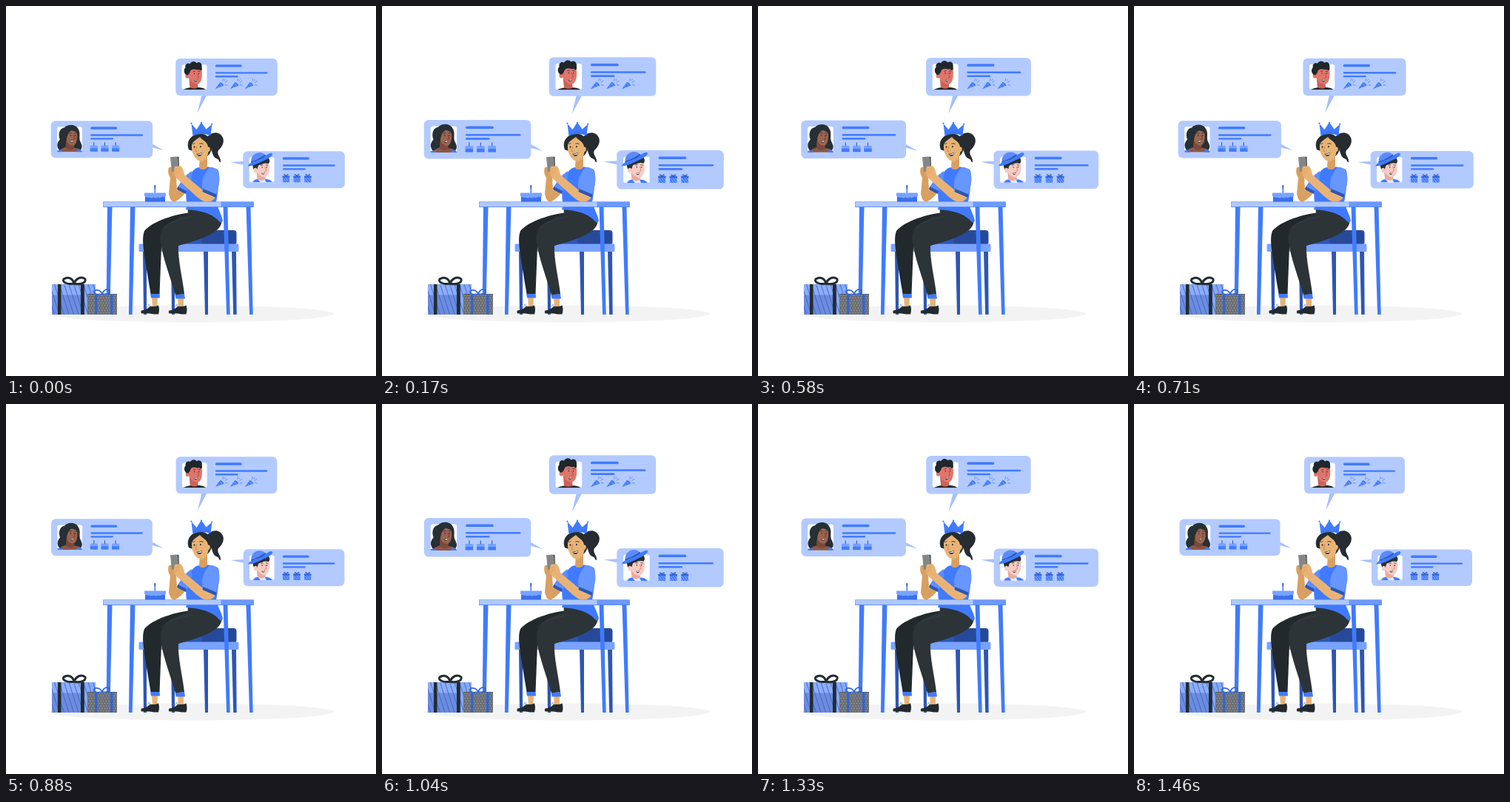
An HTML page with a canvas for the animation above (1.5 s loop, 500 by 500 pixels).

```html
<!DOCTYPE html>
<html lang="en">
<head>
<meta charset="utf-8">
<title>Birthday messages</title>
<style>
html, body { margin: 0; width: 100%; height: 100%; overflow: hidden; background: #fff; }
canvas { display: block; width: 500px; height: 500px; }
</style>
</head>
<body>
<canvas id="stage"></canvas>
<script>
const canvas = document.getElementById('stage');
const ratio = window.devicePixelRatio || 1;
canvas.width = canvas.height = 500 * ratio;
const ctx = canvas.getContext('2d');

const BLUE = '#407bff', PALE = '#b3caff', MID = '#79a2ff', NAVY = '#2d56b3', INK = '#263238';
const SKIN = '#e9b376', SKIN_SHADE = '#d99f60';
const LOOP = 1500;

// Beat of the bubbles: time in ms, growth from 0 (rest) to 1 (largest).
const BEAT = [[0, .11], [170, .63], [255, 1], [380, .75], [580, .43], [865, 0],
  [1150, 1], [1210, .77], [1460, 0], [1500, .11]];

function fill(path, color) {
  ctx.fillStyle = color;
  ctx.fill(new Path2D(path));
}

function stroke(path, color, width = 1) {
  ctx.strokeStyle = color;
  ctx.lineWidth = width;
  ctx.lineCap = ctx.lineJoin = 'round';
  ctx.stroke(new Path2D(path));
}

function box(x, y, w, h, color, r = 0) {
  ctx.fillStyle = color;
  ctx.beginPath();
  ctx.roundRect(x, y, w, h, r);
  ctx.fill();
}

function oval(x, y, rx, ry, color, turn = 0) {
  ctx.fillStyle = color;
  ctx.beginPath();
  ctx.ellipse(x, y, rx, ry, turn, 0, 7);
  ctx.fill();
}

function inside(path, draw) {
  ctx.save();
  ctx.clip(new Path2D(path));
  draw();
  ctx.restore();
}

function growth(t) {
  const i = BEAT.findIndex(([time]) => time > t);
  const [t0, a] = BEAT[i - 1], [t1, b] = BEAT[i];
  return a + (b - a) * (t - t0) / (t1 - t0);
}

function chair() {
  fill('M185 331h5v86h-4z', NAVY);
  fill('M223 331h5v86h-4z', NAVY);
  fill('M267 331h6v86h-4z', NAVY);
  fill('M305 331h6l.7 86h-4.500z', NAVY);
  box(236, 303, 75.5, 20, '#264a99', 4);
  fill('M236 303h29v20h-29z', NAVY);
  box(179.5, 321.5, 135, 10.5, MID, 1.5);
}

function table() {
  fill('M137 271h6.500l-3.200 146h-4.800z', BLUE);
  fill('M168 271h6.500l-3.800 146h-4.800z', BLUE);
  fill('M293.500 271h6l3.200 146h-4.600z', BLUE);
  fill('M324.500 271h6l3.200 146h-4.600z', BLUE);
  box(131, 264.2, 204, 7.6, '#6d98ff', .8);
  box(131.6, 264.8, 159, 6.4, '#b0c8ff');
  stroke('M131.500 271.500h203', BLUE, .6);
}

function tableCake() {
  box(188, 256, 27, 8.5, '#3a70ea');
  fill('M187 252.500h29v4q-2 3-4.500 1q-3 3-6 1q-3 2-6 0q-3 2-6 0q-4 1-6.500-2z', MID);
  stroke('M201.300 246v6', BLUE, 1.6);
  oval(201.3, 244, 1, 2.5, NAVY);
}

function bigGift() {
  box(62, 376, 59, 41, '#6b8ce0');
  box(62, 376, 59, 14.5, '#8cacfd');
  box(106, 376, 15, 41, '#85a8fa');
  inside('M62 376h59v41h-59z', () => {
    for (let x = 46; x < 122; x += 6.5) stroke(`M${x} 376l13 41`, '#3f61b4', .8);
  });
  box(70, 376, 4.5, 41, '#222c32');
  box(101, 376, 4.8, 41, '#222c32');
  stroke('M92 375C83 377 75 373 78 369C84 365 90 368 92 375C95 367 103 365 107 369C109 375 98 377 92 375', '#222c32', 3);
}

function smallGift() {
  box(110, 389, 40, 28, '#6d7075');
  for (let row = 0; row < 8; row++)
    for (let x = 112 + row % 2 * 1.8; x < 150; x += 3.6)
      oval(x, 391 + row * 3.4, .55, .8, '#a5a8ad');
  box(110, 389, 40, 1, '#55585d');
  box(120, 389, 3.5, 28, '#3265d5');
  box(141, 389, 3.5, 28, '#3265d5');
  stroke('M130 389C122 391 116 388 120 384C125 383 129 386 130 389C132 383 138 381 140 385C141 389 135 390 130 389', '#3265d5', 1.7);
}

function shoe(x) {
  fill(`M${x} 411.500Q${x + 7} 411 ${x + 12} 405.500Q${x + 18} 407 ${x + 23} 404.500Q${x + 25} 410 ${x + 23} 416.500H${x + 17}L${x + 11} 415.500L${x} 415.500Q${x - 1.500} 413 ${x} 411.500`, '#222a2f');
  stroke(`M${x + 9} 403l4 4m-1-4l-4 3`, '#8b9299', .7);
}

function legs() {
  fill('M197 393h8l-.500 13h-6.500z', SKIN);
  fill('M232 394h8v12h-7z', SKIN);
  fill('M195 389l12.500-1 .5 6.500h-12z', BLUE);
  fill('M228.500 390l12.500-1 1 6.500h-12.500z', BLUE);
  shoe(183);
  shoe(220.5);
  fill('M246 279.500C222 283 197 292 187 304C183 314 186 330 189 350L195.500 389H207.500L210 325L255 296z', '#22292d');
  fill('M245.500 274C267 276 291 278 291.500 292C289 308 260 316 233 324C232 342 239 370 241 389L229 390.500C222 366 210 336 208.500 314C209 295 228 288 246 281z', '#2d3438');
  stroke('M210 302C218 292 236 289 252 284', '#424a4f', .5);
}

function torso() {
  fill('M244 271h42C289 279 292 284 293 290Q292 294 289 292C278 279 260 276 243 275z', BLUE);
  fill('M257 219C267 216 279 217 286 221C290 225 287 249 284 265H244Q242 248 245 237Q249 224 257 219', BLUE);
  fill('M275 218.500C285 217 290 224 288 240L284 257L266 249Q262 232 275 218.500', '#6796ff');
}

function arms() {
  fill('M220 218C218 225 220 229 222 232L220 254Q222 266 229 264Q237 260 244 250L234 245L231 250L230 228L227 217z', SKIN_SHADE);
  fill('M251 223C242 228 235 239 231 247L243 253L250 240z', '#5c8eff');
  fill('M232 244L244 250L243 254L231 248z', NAVY);
  fill('M222 204L232 203.500L233 221L224 224z', '#858585');
  fill('M232 203.500l1.500 .5 .5 16-1 2z', '#303a40');
  fill('M228 217L236 216Q240 220 241 228L266 249L284 257Q279 266 269 265Q264 263 258 258L234 236Q226 230 227 222z', SKIN);
  stroke('M228 221l7-1m-8 4l7-1m-6 4l6-2', SKIN_SHADE, .7);
  fill('M266.500 247L284.500 254.500L283.500 259L265.500 251z', NAVY);
}

function head() {
  fill('M268 184C273 172 282 169 289 173C298 180 293 190 287 195C284 201 291 204 290 211C287 211 289 207 284 206C276 201 281 190 270 190z', '#262c30');
  fill('M262 204L272 200L272 218Q267 224 261 219z', SKIN_SHADE);
  fill('M247 194C243 183 250 174 260 173C270 171 280 179 279 190Q277 199 272 203L252 196z', '#262c30');
  fill('M251 188C252 183 258 180 262 177C266 182 272 183 273 190C275 200 271 209 264 210C256 209 250 199 251 188', SKIN);
  oval(273, 194, 2.7, 3.6, SKIN, .3);
  oval(254.5, 190.5, .9, 1.3, INK);
  oval(263, 190, .9, 1.3, INK);
  stroke('M252.500 186.500l2.500-1M261.500 186q2.500-1.500 5 .5', INK, .8);
  stroke('M258 190l-2 6 2 .5', '#b97940', .7);
  fill('M257.500 199.500Q262 200 264.500 197.500Q265 203 261 203Q258.500 202.500 257.500 199.500', INK);
  fill('M258 199.700Q262 200.500 264.200 198.300L263.800 200.500Q260 202 258 199.700', '#fff');
  fill('M250.500 159L257.500 167L264 157L270.500 166.500L278.500 159.500L276.500 175Q264 171 252.500 175.500z', BLUE);
  for (const [x, y] of [[250.5, 158.5], [264, 157.5], [278.3, 159.5]]) oval(x, y, 1.1, 1.1, BLUE);
  stroke('M253 173.500Q264 169.500 276 173.500', '#3266dc', .6);
}

function scene() {
  oval(250, 416, 193, 11.5, '#f3f3f3');
  chair();
  legs();
  torso();
  head();
  arms();
  table();
  tableCake();
  bigGift();
  smallGift();
}

// Bubbles are drawn from their top left corner.
function bubble(x, y, tail, pivot, scale, content) {
  ctx.save();
  ctx.translate(...pivot);
  ctx.scale(scale, scale);
  ctx.translate(x - pivot[0], y - pivot[1]);
  fill(tail, '#a5c0ff');
  box(0, 0, 136, 49.5, PALE, 6);
  box(8.3, 8, 33.5, 33.5, '#fff', 3);
  box(53, 8, 35.5, 3.4, BLUE, 1.6);
  box(53, 17.9, 70, 2.4, BLUE, 1.1);
  box(53, 22.7, 30.5, 2.4, BLUE, 1.1);
  content();
  ctx.restore();
}

function trio(draw) {
  for (let i = 0; i < 3; i++) {
    ctx.save();
    ctx.translate(53 + i * 14.5, 0);
    draw(i);
    ctx.restore();
  }
}

function smile(x, y) {
  fill(`M${x} ${y}q3 .5 4.500-1.500q0 3.800-2.700 3.800q-1.500-.8-1.800-2.300`, INK);
  fill(`M${x + .3} ${y + .2}q2.500 .5 3.900-1.200l-.3 1.700q-2 1-3.600-.5`, '#fff');
}

function eyes(x, y) {
  oval(x, y, .6, .9, INK);
  oval(x + 6, y, .6, .9, INK);
  stroke(`M${x - 1.500} ${y - 2.500}l2.500-.8m4 .3l2.500 .3`, INK, .7);
}

function popper(i) {
  ctx.translate(i * 5.3, 0);
  fill('M0 40.500L6.500 31.500Q10 32 11.500 36z', BLUE);
  stroke('M3.500 37l1.500 1.500M6 33.500l3 3', PALE, .6);
  stroke('M9.500 30.500q2-1 .8-3.500M13 32l3-2M13.500 35l3 .7M12.300 29.500l1-1.500', BLUE, .7);
}

function cake() {
  box(-.5, 36, 10, 5, BLUE);
  fill('M-.5 33h10v3q-2 2-3.300 0q-2 2-3.400 0q-2 2-3.300 0z', MID);
  stroke('M4.500 29v4', NAVY, 1);
}

function present() {
  box(0, 34, 9, 7.5, BLUE, .5);
  box(-.3, 32.8, 9.6, 2.4, '#3469df', .4);
  stroke('M1 36l4 5M4 35.500l4 5M0 39l2 2.300M7 35.500l2 2.300', PALE, .6);
  stroke('M4.500 33q-3.500-.5-3-2q2-.8 3 2q1-3 3-2q.5 1.500-3 2', NAVY, .8);
}

function curlyMan() {
  inside('M5 0H42V41.500H5z', () => {
    fill('M9 42Q13 39.500 20 38.500L32 38.500Q38 39 41 42z', '#20272b');
    fill('M18 27L29 29L30 38.500Q25 41.500 19 38.500z', '#cc6158');
    fill('M16 18C17 10 34 9 35 16C36 26 34 34 28 34.500C20 33 16 26 16 18', '#e0756b');
    oval(15.5, 23, 2.5, 3.5, '#e0756b');
    fill('M14.500 22C10 19 11 14 13 12C12 7 17 5 19 7C22 2 27 4 28 6C32 3 36 7 35 12Q36 16 33 16Q31 14 29 15Q22 13 20 16Q19 20 16.500 22z', '#20272b');
  });
  eyes(25, 20);
  stroke('M29 20l2 5-2 .5', '#a93f3d', .7);
  smile(24.5, 28.5);
  trio(popper);
}

function longHairWoman() {
  fill('M18 9C22 4 33 4 36 10C41 17 36 23 40 29Q44 37 38 40H12C7 35 8 29 12 25C9 17 12 10 18 9', '#263035');
  inside('M8 4H42V41.500H8z', () => {
    fill('M9 42Q13 37 20 35L32 36Q41 37 42 42z', '#8d5848');
    fill('M8.500 42V39.500Q15 38 17 42zM33 42Q35 38 40 38.500L41.500 42z', BLUE);
    fill('M20 26L31 28L31 37Q25 41 20 36z', '#7c4a3b');
    fill('M20 18C21 10 34 10 35 17C36 27 33 33 29 33C23 32 19 26 20 18', '#9c6350');
  });
  fill('M18 27C16 17 20 11 27 9Q35 9 36 17Q31 13 27 13Q22 17 21 24Q21 30 18 27', '#263035');
  eyes(26.5, 19.5);
  stroke('M30.500 19l1.700 5-2 .5', '#643828', .7);
  smile(25.5, 27);
  trio(cake);
}

function hatMan() {
  inside('M5 0H42V41.500H5z', () => {
    fill('M9 42Q14 37 20 36.500L31 36.500Q40 38 41 42z', '#dfe8ff');
    fill('M13 41.500Q16 37 20 37.500L23 41.500zM29 37.500Q36 37 39 41.500H31z', BLUE);
    fill('M18 28L29 29L30 37Q25 41 19 37z', '#eba99e');
    fill('M16 18C17 12 34 10 35 16C37 27 33 34.500 28 35C20 33 16 26 16 18', '#f7cbc2');
    fill('M14.500 25Q11 18 15 14L34 9Q37 14 34 16.500Q28 15 24 18Q20 18 19.500 22L18 26z', INK);
    oval(16.5, 25.5, 2.3, 3.2, '#f7cbc2');
  });
  fill('M11 17C9 8 15 2.500 21 2Q28 1 31 8z', '#5a8bfa');
  fill('M10.500 14Q19 12 29.500 4.500L31.500 8Q24 14 11 18z', NAVY);
  fill('M6.500 20Q7 16.500 15 13.500Q26 10.500 30 6Q39 0 39.500 4.500Q37 9 27 13Q13 20.500 6.500 20', BLUE);
  eyes(25.5, 21.5);
  stroke('M29.500 21l1.700 5-2 .5', '#c87568', .7);
  smile(24.5, 29);
  trio(present);
}

function frame(now) {
  const scale = 1 + .1 * growth(now % LOOP);
  ctx.setTransform(ratio, 0, 0, ratio, 0, 0);
  ctx.fillStyle = '#fff';
  ctx.fillRect(0, 0, 500, 500);
  scene();
  bubble(230, 71.5, 'M35 48L29 72.500L42 48z', [298, 107.7], scale, curlyMan);
  bubble(61.5, 155.5, 'M134 30L151 39.500L134 35z', [137, 180.2], scale, longHairWoman);
  bubble(321, 196.5, 'M2 13.500L-17 14.500L2 18.500z', [380.5, 221.2], scale, hatMan);
}

const start = performance.now();
function tick() {
  frame(performance.now() - start);
  requestAnimationFrame(tick);
}
tick();
</script>
</body>
</html>
```
